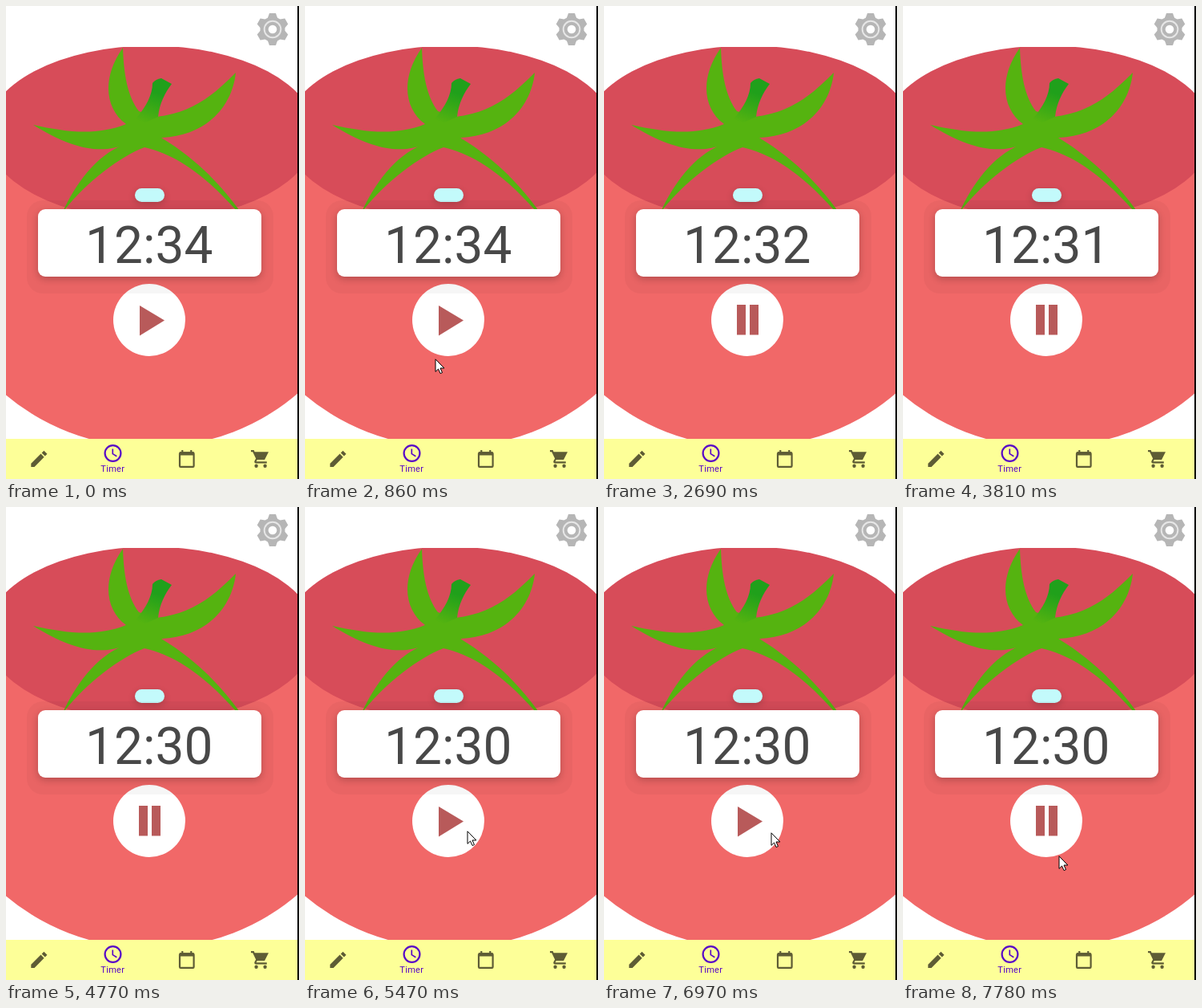
Write an HTML page that moves like this. It is 366 px wide and 589 px high and loops after 8000 ms.

```html
<!DOCTYPE html>
<html lang="en">
<head>
<meta charset="utf-8">
<title>Tomato timer</title>
<style>
  html, body { margin: 0; width: 100%; height: 100%; overflow: hidden; background: #fff; }
  svg { display: block; width: 366px; height: 589px; }
  text { font-family: Roboto, Arial, sans-serif; text-anchor: middle; }
  .line { fill: none; stroke: currentColor; stroke-width: 2; }
</style>
</head>
<body>
<svg viewBox="0 0 366 589">
  <defs>
    <linearGradient id="stemFill" gradientUnits="userSpaceOnUse" x1="195" y1="92" x2="174" y2="146">
      <stop offset=".3" stop-color="#20a01b"/>
      <stop offset="1" stop-color="#55b310"/>
    </linearGradient>
    <filter id="soft" x="-30%" y="-60%" width="160%" height="220%">
      <feGaussianBlur stdDeviation="5"/>
    </filter>
    <clipPath id="below"><rect y="51" width="366" height="538"/></clipPath>
  </defs>

  <g clip-path="url(#below)">
    <ellipse cx="181" cy="300" rx="269" ry="249.4" fill="#f16868"/>
    <ellipse cx="181" cy="158" rx="206" ry="108.5" fill="#d74c59"/>
  </g>

  <!-- Sepals, clockwise from the top one -->
  <path fill="#55b310" d="M146 52C147 85 152 113 166 131L188 138C232 133 257 113 287 83
    C283 122 254 161 194 164C236 189 270 224 291 254H287C260 224 222 187 173 176
    C143 187 101 219 73 254H72C91 214 119 181 152 171C120 186 82 178 34 148
    C75 157 113 162 150 147C124 128 119 90 146 52Z"/>
  <path fill="url(#stemFill)" d="M183 96Q187 91 194 90L207 97C198 109 192 121 190 138L172 146L162 141C175 125 183 111 183 96Z"/>

  <rect x="161" y="230" width="37" height="17" rx="8.5" opacity=".18" filter="url(#soft)"/>
  <rect x="161" y="227" width="37" height="17" rx="8.5" fill="#c3fafb"/>

  <circle cx="179" cy="391" r="45" fill="#fff"/>
  <rect x="26" y="242" width="308" height="116" rx="20" opacity=".035"/>
  <rect x="40" y="256" width="279" height="84" rx="9" opacity=".22" filter="url(#soft)"/>
  <rect x="40" y="253" width="279" height="84" rx="9" fill="#fff"/>
  <text id="clock" x="178.8" y="320" font-size="64" fill="#484848">12:34</text>

  <g fill="#b85a5a">
    <path id="play" d="M167 373L198 391.5L167 410.5Z"/>
    <path id="pause" d="M166 372h11v37.5h-11zM182 372h11v37.5h-11z"/>
  </g>

  <g id="gear" transform="translate(333 29)" fill="#b6b6b6">
    <circle r="15.5"/>
    <circle r="10.3" fill="none" stroke="#e6e6e6" stroke-width="2"/>
    <circle r="5.3" fill="#fff"/>
  </g>

  <rect y="539" width="364" height="50" fill="#fdff98"/>
  <!-- Each tab icon is drawn on a 24-unit grid -->
  <g id="tabs" fill="currentColor" color="#5e5c35">
    <path d="M3 17.2V21H6.8L17.8 9.9L14.1 6.2ZM15.1 5.1L17.6 2.7L21.3 6.4L18.9 8.9Z"/>
    <g color="#5808c7">
      <circle class="line" cx="12" cy="12" r="9"/>
      <path class="line" style="stroke-width:1.5" d="M11.8 7V12.6L16.4 15.4"/>
    </g>
    <g>
      <rect class="line" x="4" y="5" width="16" height="16" rx="1"/>
      <path d="M4 4H20V8H4ZM6 2H8V5H6ZM16 2H18V5H16Z"/>
    </g>
    <g>
      <path d="M1 2H4.3L5.2 4H21L16.5 13H8L7 15H19V17H7Q4 16.5 5.2 14L6.6 11.6L3 4H1Z"/>
      <circle cx="7" cy="20" r="2"/><circle cx="17" cy="20" r="2"/>
    </g>
  </g>
  <text x="133.3" y="580" font-size="11" letter-spacing=".3" fill="#5808c7">Timer</text>
  <rect x="364" width="2" height="589"/>

  <path id="cursor" fill="#fff" stroke="#000" d="M1 .8V16.4L4.5 13L7.1 18.6L9.5 17.5L7 12H11.9Z"/>
</svg>
<script>
const LOOP = 8000;
const START = 1800, STOP = 5470, RESUME = 7090;
const STEP = 135;                 // the pointer is redrawn at this interval
const $ = id => document.getElementById(id);

for (let i = 0; i < 6; i++) {
  $('gear').insertAdjacentHTML('afterbegin',
    `<path d="M-6.5 -13L-4 -20H4L6.5 -13Z" transform="rotate(${i * 60})"/>`);
}

[...$('tabs').children].forEach((icon, i) => {
  const y = i === 1 ? 557 : 564;  // the active tab is lifted above its label
  icon.setAttribute('transform', `translate(${41.2 + i * 92.3} ${y}) scale(1.1) translate(-12 -12)`);
});

// Pointer visits: one point per step, the last one held until the end.
const VISITS = [
  { from: 575, to: 1920, path: [[147, 469], [143, 455], [162, 439], [185, 423], [156, 406], [208, 394], [187, 382]] },
  { from: 1920, to: 2040, path: [[154, 535]] },
  { from: 5185, to: 6415, path: [[208, 455], [206, 406], [202, 403]] },
  { from: 6415, to: LOOP, path: [[229, 371], [322, 438], [295, 467], [253, 451], [208, 405], [208, 405],
                                 [49, 394], [140, 378], [237, 371], [39, 365], [194, 434]] }
];

function pointer(t) {
  const visit = VISITS.find(v => t >= v.from && t < v.to);
  return visit && visit.path[Math.min(Math.floor((t - visit.from) / STEP), visit.path.length - 1)];
}

// The first second drops at once, the others follow each second until the stop.
function clockText(t) {
  const ticks = t < START ? 0 : 1 + Math.floor((Math.min(t, STOP) - START + 120) / 1000);
  return '12:' + (34 - ticks);
}

const show = (node, on) => node.setAttribute('visibility', on ? 'visible' : 'hidden');

function draw(t) {
  const running = (t >= START && t < STOP) || t >= RESUME;
  const point = pointer(t);
  $('clock').textContent = clockText(t);
  show($('pause'), running);
  show($('play'), !running);
  show($('cursor'), point);
  if (point) $('cursor').setAttribute('transform', `translate(${point})`);
}

const begin = performance.now();
function frame() {
  draw((performance.now() - begin) % LOOP);
  requestAnimationFrame(frame);
}
frame();
</script>
</body>
</html>
```
